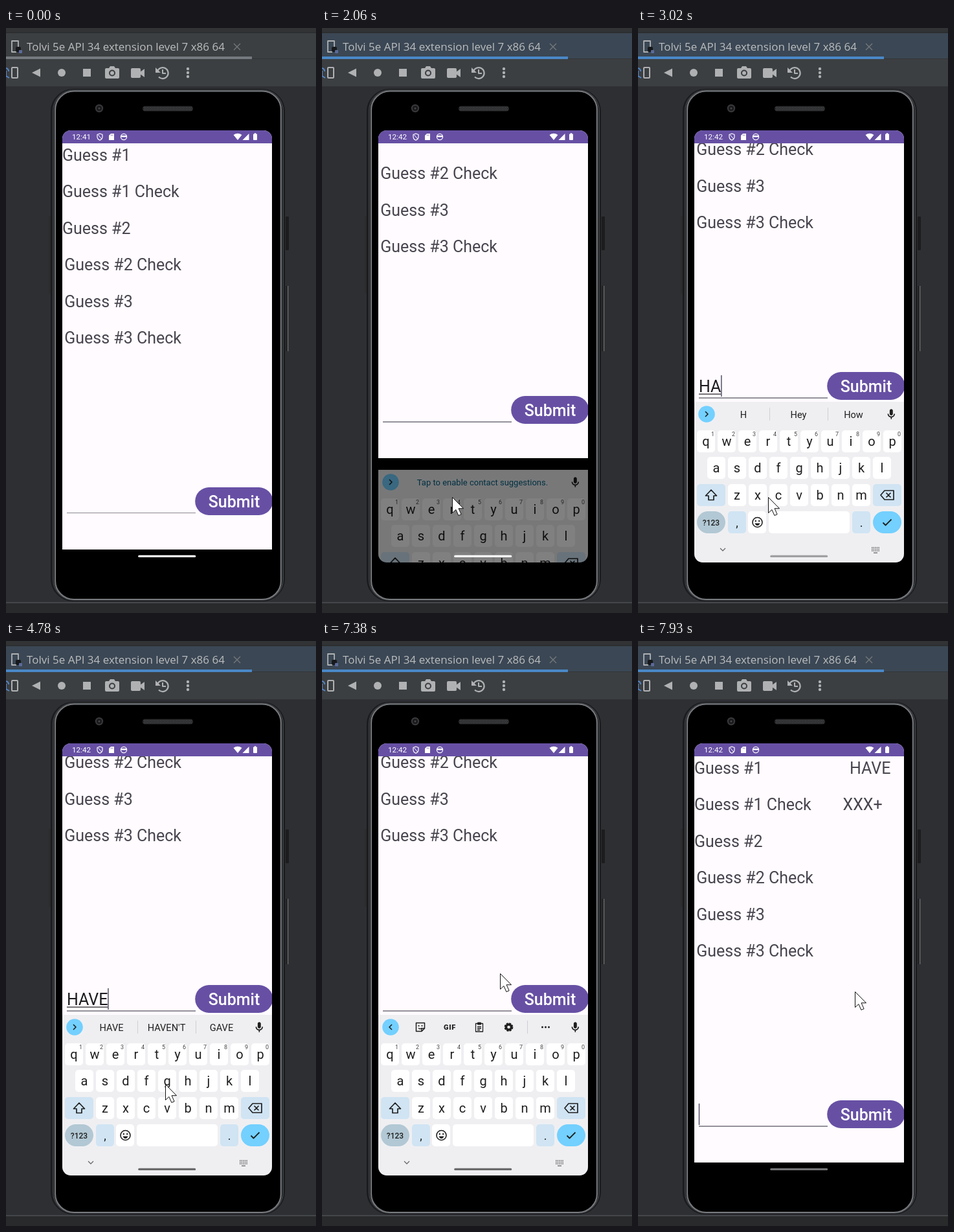
An HTML page that plays this animation: 479x903 px, repeating every 8 s.

```html
<!DOCTYPE html>
<html lang="en">
<head>
<meta charset="utf-8">
<title>Guessing app in an emulator</title>
<style>
html, body { margin: 0; width: 100%; height: 100%; overflow: hidden; background: #2e2f33; }
svg { display: block; width: 479px; height: 903px; font-family: Roboto, sans-serif; }
text { white-space: pre; }
</style>
</head>
<body>
<svg id="stage" viewBox="0 0 479 903"></svg>
<script>
const LOOP = 8000, STEP = 69;
const INK = '#1f1f1f', GREY = '#afb1b3', PURPLE = '#6750a4';

const rect = (x, y, w, h, fill, rx = 0, more = '') =>
  `<rect x="${x}" y="${y}" width="${w}" height="${h}" rx="${rx}" fill="${fill}" ${more}/>`;
const circle = (x, y, r, fill, more = '') =>
  `<circle cx="${x}" cy="${y}" r="${r}" fill="${fill}" ${more}/>`;
const text = (x, y, s, size, fill, more = '') =>
  `<text x="${x}" y="${y}" font-size="${size}" fill="${fill}" ${more}>${s}</text>`;
const label = (x, y, s, size, fill = INK, more = '') =>
  text(x, y, s, size, fill, `text-anchor="middle" ${more}`);
const shape = (d, fill, more = '') => `<path d="${d}" fill="${fill}" ${more}/>`;
const line = (d, colour, width = 1.5, more = '') =>
  shape(d, 'none', `stroke="${colour}" stroke-width="${width}" stroke-linejoin="round" ${more}`);

function ide() {
  return rect(0, 0, 479, 903, '#2e2f33') + rect(0, 0, 479, 8, '#313335') + rect(0, 6.5, 479, 1, '#292b2d') +
    rect(0, 8, 479, 40, '#3c3f41', 0, 'id="header"') + rect(0, 47, 479, 1, '#323537') +
    rect(0, 44, 380, 4, '#747a80', 0, 'id="tabLine"') + rect(0, 48, 479, 42, '#3c3f41') +
    rect(0, 886, 479, 2, '#43464a') + rect(0, 888, 479, 15, '#292a2c') +
    // tab
    line('M16 37H9V20H19V29', GREY, 1.8) + rect(15, 29, 8, 8, '#17191c', 2) + rect(20, 34, 5, 5, '#5a6a9a', 1) +
    text(32, 35, 'Tolvi 5e API 34 extension level 7 x86 64', 17, '#bbbdbf', 'font-family="Open Sans, sans-serif"') +
    line('M352 24L362 34M362 24L352 34', '#75797c', 1.3) +
    // toolbar
    rect(9, 61, 9, 16, 'none', 1, `stroke="${GREY}" stroke-width="2"`) +
    line('M0 62Q4 63 4 67M0 66V74L5 77', '#5585c5', 2) +
    shape('M53 62.5V75.5L40 69Z', GREY) + circle(86, 69, 6, GREY) + rect(119, 63, 12, 12, GREY) +
    shape('M155 62H159L161 59H167L169 62H173Q175 62 175 64V76Q175 78 173 78H155Q153 78 153 76V64Q153 62 155 62Z', GREY) +
    circle(164, 69.5, 5, '#3c3f41') + circle(164, 69.5, 3, GREY) +
    rect(193, 62, 15, 15, GREY, 2) + shape('M207 68L214 63V76L207 71Z', GREY) +
    line('M234 67A8.5 8.5 0 1 1 236 75.5', GREY, 2.2) + shape('M231 61V69H239Z', GREY) + line('M242 64V70H247', GREY, 2) +
    [63, 69, 75].map(y => circle(281, y, 2.2, GREY)).join('');
}

function phone() {
  return rect(432, 291, 5, 52, '#1c1c1e', 1) +
    rect(432, 398, 5, 101, '#242527', 1) + rect(435.2, 398, 1.2, 101, '#77797c') +
    rect(66.5, 290, 2, 120, '#2a2b2d') +
    rect(69.5, 94.5, 361, 790, '#1d1e20', 34, 'stroke="#17181a"') +
    rect(73, 96, 355, 787, '#0b0b0c', 32, 'stroke="#3a3c3f" stroke-width="2"') +
    rect(76, 97.5, 349, 784.5, '#000', 29, 'stroke="#75787c" stroke-width="2.2"') +
    circle(144, 124, 6.2, '#38383b') + circle(144, 124, 4, '#19191b') + circle(144, 124, 1.5, '#45464a') +
    rect(211, 120.5, 78, 8, '#28292a', 4) +
    [122.5, 124.5, 126.5].map((y, i) =>
      line(`M${213 + i % 2} ${y}H287`, '#55575a', 1, 'stroke-dasharray="1.2 1.3"')).join('');
}

function statusBar() {
  const w = '#fff';
  return rect(87, 158, 324, 20, PURPLE) +
    text(102, 172, '12:41', 11.7, w, 'id="clock"') +
    line('M145 163L149 164.5V168Q149 171.5 145 173.3Q141 171.5 141 168V164.5Z', w, 1.2) + line('M142.5 165L147.5 171', w, 1) +
    shape('M162 163H167V173H159V166Z', w) + line('M162.5 164.5V166.5M164.7 164.5V166.5', PURPLE, .8) +
    circle(182, 168, 4.6, 'none', 'stroke="#fff" stroke-width="1.2"') + rect(178, 166, 8, 2.4, w) +
    shape('M351.5 165Q358 160.5 364.5 165L358 173Z', w) + shape('M375.5 163V173H365.5Z', w) +
    rect(382, 163.5, 6, 9.5, w, 1) + rect(383.7, 162.3, 2.6, 2, w);
}

function app() {
  const names = [1, 2, 3].flatMap(n => [`Guess #${n}`, `Guess #${n} Check`]);
  const guesses = names.map((s, i) => text(i < 3 ? 87 : 90.2, 204.5 + 56.5 * i, s, 25, '#49454f')).join('');
  return rect(87, 0, 324, 805, '#fffbfe') + guesses +
    `<g id="result">${text(327, 204.5, 'HAVE', 25, '#49454f') + text(316.5, 261, 'XXX+', 25, '#49454f')}</g>` +
    rect(94, 748, 199, 1, '#8b8891', 0, 'id="fieldLine"') +
    text(94, 740, '', 25, '#1c1b1f', 'id="entry"') +
    rect(94, 742.5, 0, 1.2, '#1c1b1f', 0, 'id="compose"') +
    rect(94, 714, 1.4, 33, '#4b4460', 0, 'id="caret"') +
    rect(292.2, 709, 120, 43, PURPLE, 21.5, 'id="button"') +
    label(352.5, 740, 'Submit', 25, '#fff', 'font-weight="500"');
}

function keyboard() {
  const key = (x, y, w = 28, fill = '#fff', rx = 5) => rect(x, y - 17, w, 34, fill, rx);
  const row = (letters, x, y) => [...letters].map((c, i) =>
    key(x + 32 * i - 14, y) + label(x + 32 * i, y + 6.5, c, 20)).join('');
  const digits = [...'1234567890'].map((d, i) => label(115.5 + 32 * i, 630, d, 9, '#444')).join('');
  const pale = '#d0e4f3', sky = '#73d0ff';
  const dots = [802, 804.5, 807].map(y => line(`M361 ${y}H373`, '#666', 1.3, 'stroke-dasharray="1.5 1.1"')).join('');
  return rect(87, 577, 324, 248, '#efeff2') +
    circle(106, 596, 12.8, sky) + line('', INK, 1.6, 'id="chevron"') +
    shape('M12 14c1.7 0 3-1.3 3-3V5c0-1.7-1.3-3-3-3S9 3.3 9 5v6c0 1.7 1.3 3 3 3zM17 11c0 2.8-2.2 5-5 5s-5-2.2-5-5H5c0 3.5 2.6 6.4 6 6.9V21h2v-3.1c3.4-.5 6-3.4 6-6.9z', INK,
      'transform="translate(381.5 586.5) scale(.82)"') +
    '<g id="strip"></g>' +
    row('qwertyuiop', 105, 638) + digits + row('asdfghjkl', 121, 679) + row('zxcvbnm', 153, 721) +
    key(91, 721, 44, pale) + line('M113 713L121.5 722H117V728.5H109V722H104.5Z', INK, 1.7) +
    key(363, 721, 44, pale) + line('M381 714H395V728H381L375 721Z M383.5 717.5L390.5 724.5M390.5 717.5L383.5 724.5', INK, 1.7) +
    key(91, 763, 44, '#b2c8d4', 17) + label(113, 767.5, '?123', 12, INK, 'font-weight="500"') +
    key(139, 763, 28, pale) + label(153, 770, ',', 18) +
    key(170, 763) + circle(184.5, 763, 7.5, 'none', `stroke="${INK}" stroke-width="1.6"`) +
    circle(181.8, 761, 1.2, INK) + circle(187.2, 761, 1.2, INK) + shape('M180.5 764.5H188.5Q187 768 184.5 768T180.5 764.5Z', INK) +
    key(202, 763, 125) + key(331, 763, 28, pale) + label(345, 770, '.', 18) +
    key(363, 763, 44, sky, 17) + line('M378.5 763.5L382.5 767.5L391.5 758.5', INK, 1.8) +
    line('M127 803L131 807L135 803', '#666', 1.2) + dots + rect(364, 809.5, 6, 1.3, '#666');
}

const divider = x => rect(x, 586, 1, 20, '#cfcfd3');
function words(list) {
  return divider(203) + divider(293) +
    list.split('|').map((s, i) => label(163 + 85 * i, 602, s, 14.6)).join('');
}
function tools() {
  const teeth = circle(288.5, 596, 5.7, 'none', `stroke="${INK}" stroke-width="2.4" stroke-dasharray="3 1.477"`);
  return line('M145.5 589.5H158.5V598L154 602.5H145.5Z M158.5 598H154V602.5', INK) +
    circle(149.5, 594, 1.1, INK) + circle(154.5, 594, 1.1, INK) + line('M149 597.5Q151.5 600 154 597.5', INK, 1.3) +
    label(197.5, 600, 'GIF', 11, INK, 'font-weight="900" letter-spacing=".8"') +
    line('M237.5 590.5H248.5V603H237.5Z M240 595.5H246M240 598H246M240 600.5H244', INK, 1.3) + rect(240, 588.5, 6, 4, INK, 1) +
    circle(288.5, 596, 4, 'none', `stroke="${INK}" stroke-width="3.4"`) + teeth +
    divider(317) + [340.5, 345.5, 350.5].map(x => circle(x, 596, 1.5, INK)).join('');
}
const hint = label(248, 600.5, 'Tap to enable contact suggestions.', 13, '#00607f');

stage.innerHTML =
  '<clipPath id="screen">' + rect(87, 158, 324, 667, '#000', 13) + '</clipPath>' + ide() + phone() +
  `<g clip-path="url(#screen)"><g id="app">${app()}</g><g id="keys">${keyboard()}</g>${statusBar()}</g>` +
  rect(204.2, 813.7, 89, 3.3, '#fff', 1.6, 'id="pill"') +
  shape('M0 0V24L5.4 19L9.4 28L13.6 26.2L9.6 17.2H17Z', '#fff', 'id="pointer" stroke="#111" stroke-width="1" stroke-linejoin="round"');

const ids = {};
for (const el of stage.querySelectorAll('[id]')) ids[el.id] = el;
const set = (id, name, value) => ids[id].setAttribute(name, value);

// time, x, y
const pointerKeys = [
  [310, 407, 886], [580, 330, 800], [830, 240, 742], [1070, 204, 724], [1730, 203, 724], [1790, 201, 724],
  [4779, 201, 724], [4780, 246, 684], [5200, 300, 585], [5540, 321, 543], [5610, 340, 545], [5870, 340, 545],
  [6220, 329, 534], [6440, 311, 485], [6630, 311, 485], [6770, 260, 468], [7030, 260, 468], [7380, 275, 513],
  [7790, 370, 548], [7860, 360, 546], [7930, 335, 541]];
// time, content shift, keyboard drop, keyboard opacity
const panelKeys = [
  [0, 0, 248, 0], [2059, 0, 248, 0], [2060, 141, 105, .5], [2130, 158, 60, .75], [2200, 170, 25, 1],
  [2270, 176, 6, 1], [2340, 178, 0, 1], [7450, 178, 0, 1], [7520, 160, 25, .9], [7590, 110, 90, .5],
  [7660, 45, 170, .2], [7730, 0, 248, 0]];
const entrySteps = [[0, ''], [2330, 'H'], [2960, 'HA'], [3160, 'HAV'], [3410, 'HAVE'], [5940, '']];
const stripSteps = [[0, hint], [2400, words('H|Hey|How')], [3230, words('HAV|HAVE|HAVING')],
  [3440, words("HAVE|HAVEN'T|GAVE")], [5940, tools()]];
const pillSteps = [[0, '#fff'], [2680, '#a0a0a2'], [3710, '#6a6a6c'], [7860, '#747476']];
const caretOn = [[1400, 1790], [2290, 2820], [2960, 3910], [4380, 4870], [5370, 6130], [6630, 7130], [7630, LOOP]];

const lastKey = (keys, t) => keys.findLastIndex(k => k[0] <= t);
const pick = (steps, t) => steps[lastKey(steps, t)][1];
const within = (t, a, b) => t >= a && t < b;

function track(keys, t) {
  const i = Math.max(0, lastKey(keys, t)), a = keys[i], b = keys[i + 1] || a;
  const held = Math.max(0, Math.floor((t - a[0] + 1) / STEP) * STEP);
  const u = a === b ? 0 : Math.min(1, held / (b[0] - a[0]));
  return a.slice(1).map((v, j) => v + (b[j + 1] - v) * u);
}

let shownStrip;
function draw(t) {
  const active = t >= 1200, focused = t >= 1330;
  set('header', 'fill', active ? '#3b4754' : '#3c3f41');
  set('tabLine', 'fill', active ? '#4a88c7' : '#747a80');
  ids.clock.textContent = t >= 1400 ? '12:42' : '12:41';

  const [shift, drop, alpha] = track(panelKeys, t);
  set('app', 'transform', `translate(0 ${-shift})`);
  set('keys', 'transform', `translate(0 ${drop})`);
  set('keys', 'opacity', alpha);
  set('pill', 'fill', pick(pillSteps, t));

  const entry = pick(entrySteps, t);
  ids.entry.textContent = entry;
  const width = entry ? ids.entry.getComputedTextLength() : 0;
  set('compose', 'width', width);
  set('caret', 'x', 93.8 + width);
  set('caret', 'opacity', caretOn.some(([a, b]) => within(t, a, b)) ? 1 : 0);
  set('fieldLine', 'fill', focused ? '#5d5a68' : '#8b8891');
  set('fieldLine', 'y', focused ? 748.4 : 748);
  set('fieldLine', 'height', focused ? 1.3 : 1);
  set('button', 'fill', within(t, 5870, 6440) ? '#6f59aa' : PURPLE);
  set('result', 'opacity', t >= 5940 ? 1 : 0);

  const strip = pick(stripSteps, t);
  if (strip !== shownStrip) ids.strip.innerHTML = shownStrip = strip;
  set('chevron', 'd', t >= 5940 ? 'M108 592L104 596L108 600' : 'M104 592L108 596L104 600');

  const [x, y] = track(pointerKeys, t);
  set('pointer', 'transform', `translate(${x + .5} ${y + .5})`);
  set('pointer', 'opacity', t >= 310 ? 1 : 0);
}

function tick() {
  draw(performance.now() % LOOP);
  requestAnimationFrame(tick);
}
tick();
</script>
</body>
</html>
```
